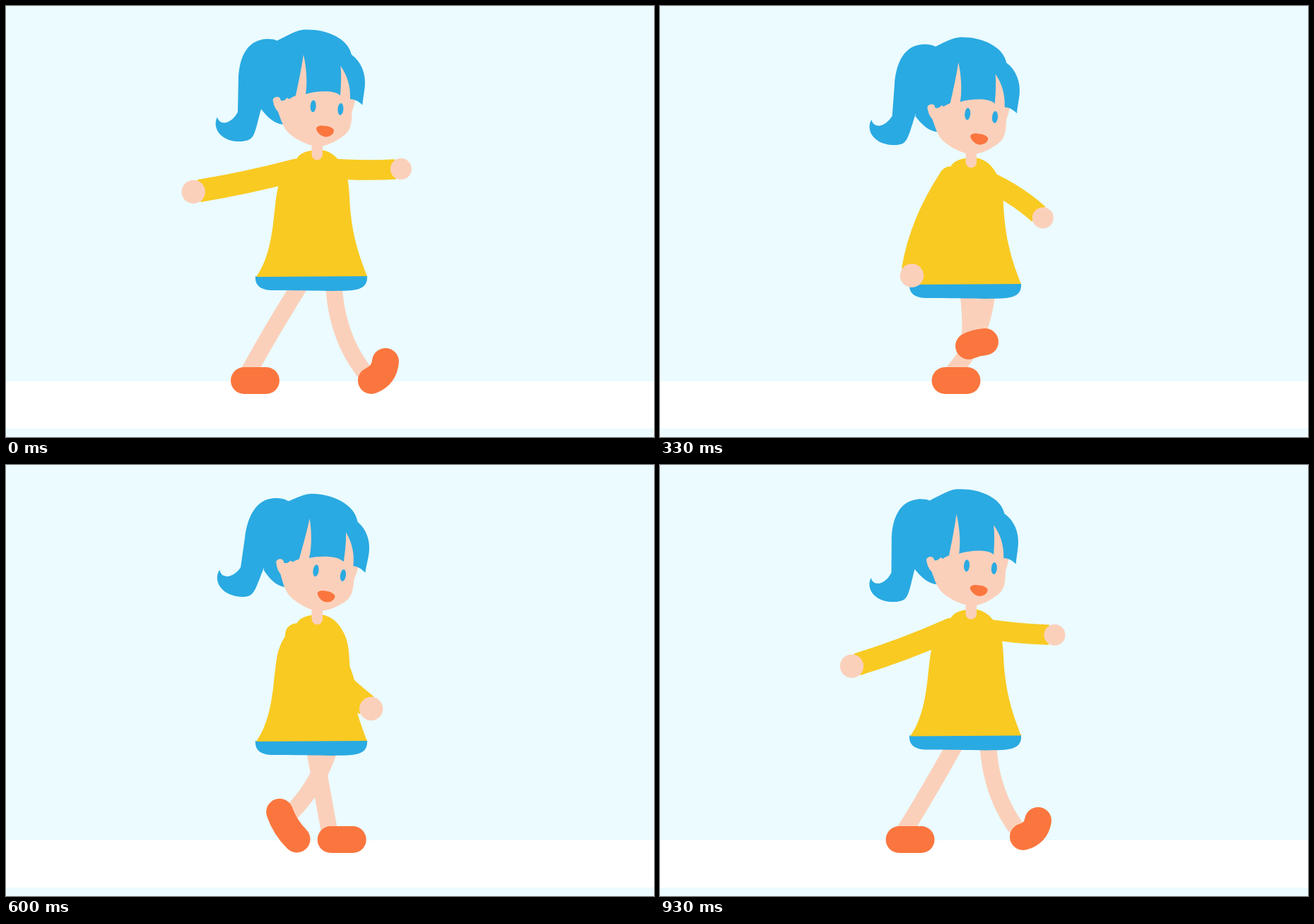
These frames come from a looping animation (917 px wide and 611 px high, 960 ms). An HTML page with a canvas:

```html
<!DOCTYPE html>
<html lang="en">
<head>
<meta charset="utf-8">
<title>Walking girl</title>
<style>
  html, body { margin: 0; width: 100%; height: 100%; overflow: hidden; background: #ebfbff; }
  canvas { display: block; }
</style>
</head>
<body>
<canvas id="stage" width="917" height="611"></canvas>
<script>
const ctx = document.getElementById('stage').getContext('2d');
const LOOP = 960, STEP = 30;
const SKY = '#ebfbff', BLUE = '#2aaae2', YELLOW = '#f9ca22', SKIN = '#fbd0bb', ORANGE = '#fb763e';
const HIP = { x: 432, y: 370 }, HIP_GAP = 32;

const shapes = {
  pony: 'M400 62 L384 49 C378 46 368 46 360 48 C340 53 329 75 329 108 L328 150 C323 160 314 166 308 165 C303 165 300 161 299 157 C294 166 297 178 307 185 C317 193 340 194 347 187 C353 182 356 163 361 146 L400 130Z',
  backHair: 'M400 45 C375 55 366 90 361 146 C370 158 380 167 392 168 L430 150 L430 60Z',
  face: 'M378 135 C376 130 385 126 388 131 L420 60 L480 75 L494 133 C493 143 489 149 489.5 153 C489 168 487 177 479 183 C466 193 453 199 441 199 C425 198 405 186 398 178 C391 169 389 161 385 150 C381 146 379 141 378 135Z',
  frontHair: 'M382 50 C400 41 412 34 422 33.5 C452 32 484 45 489 69 C503 79 509 96 508 112 C507 124 505 132 504.5 140.5 C500 136 494 132 487 132 C488 115 483 98 473.5 85 C475 100 474 115 473 127 C466 119 440 120 424 125 C427 110 425 85 421 69 C418 90 414 108 410 127 C406 129 403 130 401 132 L398 130 Q394 135 389 134 L388 131 C385 110 380 80 382 50Z',
  mouth: 'M439 173 C441 169 447 169 451 170 C457 170 463 173 464 176 C464 182 459 185 453 185.5 C447 186 439 179 439 173Z',
  dress: 'M354 384 C367 366 375 340 379 300 C382 275 383 262 386 254 C391 238 400 226 411 217 C416 208 426 205 440 204 C458 203 470 214 478 230 C484 242 485 252 486 270 C488 315 496 345 511 383Z',
  hem: 'M353 383 L511 382 C512 395 506 401 490 403 C465 405 425 403 375 403 C360 402 352 396 353 383Z'
};
for (const name in shapes) shapes[name] = new Path2D(shapes[name]);

// Step cycle: phase, heel x, heel y, toe dx, toe dy, sole bulge, knee x
const gait = [
  [0, 337, 531, 31, 0, 0, 371],
  [30, 329, 512, 37, 15, 5, 380],
  [90, 342, 500, 24, 42, 4, 405],
  [210, 403, 472, 26, 12, -2.5, 446],
  [240, 408, 474, 24, 7, -2.5, 447],
  [330, 437, 482, 23, -6, -1, 443],
  [360, 452, 492, 23, -10, 1, 439],
  [450, 482, 527, 21, -23, 5, 429],
  [480, 485, 531, 20, -27, 5, 428],
  [510, 483, 531, 31, 0, 0, 433],
  [690, 424.5, 531, 31, 0, 0, 458],
  [720, 411, 531, 31, 0, 0, 458],
  [810, 371.5, 531, 31, 0, 0, 432],
  [840, 360, 531, 31, 0, 0, 412],
  [930, 338.5, 531, 31, 0, 0, 379]
];

const wave = (t, peak, period) => Math.cos(2 * Math.PI * (t - peak) / period);
const rad = deg => deg * Math.PI / 180;

function keyAt(i) {
  const n = gait.length, turn = Math.floor(i / n), row = gait[i - turn * n];
  return [row[0] + turn * LOOP, ...row.slice(1)];
}

// Monotone cubic interpolation, so poses never overshoot
function sampleGait(phase) {
  phase %= LOOP;
  let i = gait.length - 1;
  while (gait[i][0] > phase) i--;
  const [k0, k1, k2, k3] = [i - 1, i, i + 1, i + 2].map(keyAt);
  const span = k2[0] - k1[0], u = (phase - k1[0]) / span;
  const slope = (a, b, c) => (b[c] - a[c]) / (b[0] - a[0]);
  const tangent = (p, q) => p * q <= 0 ? 0 : 2 * p * q / (p + q);
  return k1.slice(1).map((v, j) => {
    const c = j + 1, d = slope(k1, k2, c);
    const m1 = tangent(slope(k0, k1, c), d) * span;
    const m2 = tangent(d, slope(k2, k3, c)) * span;
    const diff = k2[c] - v;
    return v + u * (m1 + u * (3 * diff - 2 * m1 - m2 + u * (m1 + m2 - 2 * diff)));
  });
}

function fill(shape, color) {
  ctx.fillStyle = color;
  ctx.fill(shape);
}

function disc(x, y, rx, color, ry = rx, tilt = 0) {
  ctx.fillStyle = color;
  ctx.beginPath();
  ctx.ellipse(x, y, rx, ry, tilt, 0, 2 * Math.PI);
  ctx.fill();
}

function tube(x0, y0, cx, cy, x1, y1, width, color, cap) {
  ctx.lineWidth = width;
  ctx.lineCap = cap;
  ctx.strokeStyle = color;
  ctx.beginPath();
  ctx.moveTo(x0, y0);
  ctx.quadraticCurveTo(cx, cy, x1, y1);
  ctx.stroke();
}

function turn(x, y, angle) {
  ctx.translate(x, y);
  ctx.rotate(angle);
  ctx.translate(-x, -y);
}

function drawLeg(phase, shift, bob) {
  const [hx, hy, dx, dy, bulge, knee] = sampleGait(phase);
  const hipY = HIP.y + bob;
  const len = Math.hypot(dx, dy);
  ctx.save();
  ctx.translate(shift, 0);
  tube(HIP.x, hipY, knee, hipY + 0.6 * (hy - hipY), hx + 0.45 * Math.max(0, dy), hy, 23.5, SKIN, 'butt');
  tube(hx, hy,
    hx + dx / 2 - 2 * bulge * dy / len,
    hy + dy / 2 + 2 * bulge * dx / len,
    hx + dx, hy + dy, 38, ORANGE, 'round');
  ctx.restore();
}

// The angle is measured from straight down, positive forward
function drawArm(x, y, length, angle, bow, width, handRadius) {
  const sx = Math.sin(angle), cs = Math.cos(angle);
  const hx = x + length * sx, hy = y + length * cs;
  const cx = (x + hx) / 2 + 2 * bow * cs;
  const cy = (y + hy) / 2 - 2 * bow * sx;
  const reach = 8 / Math.hypot(hx - cx, hy - cy);
  disc(x, y, width / 2, YELLOW);
  tube(x, y, cx, cy, hx - reach * (hx - cx), hy - reach * (hy - cy), width, YELLOW, 'butt');
  disc(hx, hy, handRadius, SKIN);
}

function drawHead(t) {
  ctx.save();
  turn(440, 200, rad(1.75 + 2.7 * wave(t, 175, LOOP / 2)));
  ctx.save();
  turn(440, 150, rad(2.15 + 2.43 * wave(t, 215, LOOP / 2)));
  fill(shapes.pony, BLUE);
  ctx.restore();
  fill(shapes.backHair, BLUE);
  fill(shapes.face, SKIN);
  fill(shapes.frontHair, BLUE);
  disc(434.7, 142, 4, BLUE, 8.5, rad(4));
  disc(473.5, 146.2, 4, BLUE, 8.5, rad(4));
  fill(shapes.mouth, ORANGE);
  ctx.restore();
}

function draw(t) {
  const bob = 8 * (1 - wave(t, 0, LOOP / 2));
  ctx.fillStyle = SKY;
  ctx.fillRect(0, 0, 917, 611);
  ctx.fillStyle = '#fff';
  ctx.fillRect(0, 532, 917, 67);

  drawLeg(t + LOOP / 2, HIP_GAP, bob);
  drawLeg(t, 0, bob);

  ctx.save();
  ctx.translate(0, bob);
  drawArm(446, 229.5, 113, rad(58 + 37.5 * wave(t, 90, LOOP)), 2.5 + 4.5 * wave(t, 480, LOOP), 28.5, 15);
  fill(shapes.hem, BLUE);
  fill(shapes.dress, YELLOW);
  tube(440.3, 188, 440.3, 200, 440.3, 210.5, 15.5, SKIN, 'round');
  drawHead(t);
  drawArm(411, 232.5, 149, rad(-21.5 - 68 * wave(t, 90, LOOP)), -3 - 5.5 * wave(t, 400, LOOP), 32, 16.7);
  ctx.restore();
}

const start = performance.now();
function tick() {
  const t = Math.max(0, performance.now() - start) % LOOP;
  draw(Math.floor(t / STEP) * STEP);
  requestAnimationFrame(tick);
}
tick();
</script>
</body>
</html>
```
